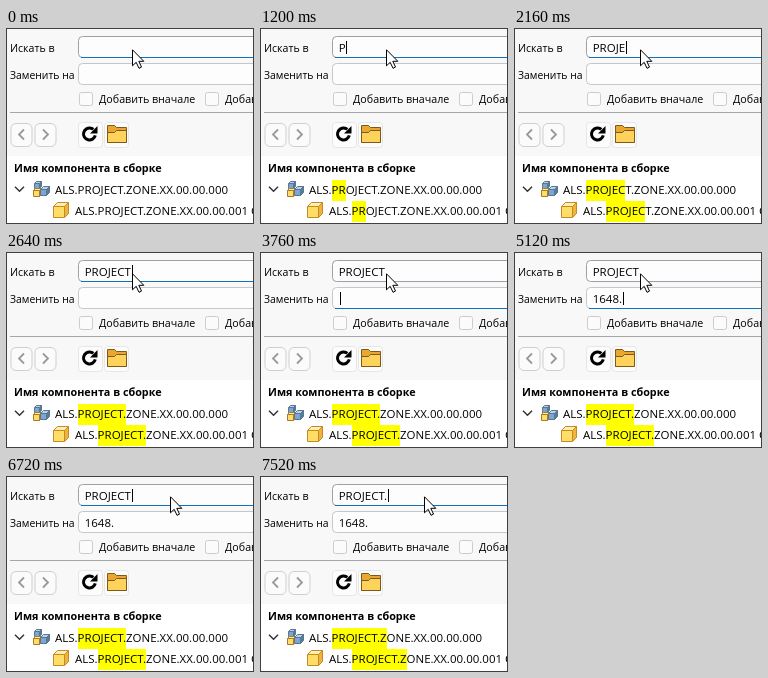
An HTML page with a canvas for the animation above (8000 ms loop, 248 by 196 pixels).

```html
<!DOCTYPE html>
<html lang="ru">
<head>
<meta charset="utf-8">
<title>Поиск и замена</title>
<style>
  html, body { margin: 0; width: 100%; height: 100%; overflow: hidden; background: #fff; }
  canvas { display: block; width: 248px; height: 196px; }
</style>
</head>
<body>
<canvas id="stage" width="248" height="196"></canvas>
<script>
const ctx = document.getElementById('stage').getContext('2d');
const LOOP = 8000;
const KEY_GAP = 240;
const FONT = '"Open Sans", "Noto Sans", sans-serif';
const TEXT_SIZE = 11.5;
const PREFIX = 'ALS.';
const NAME = PREFIX + 'PROJECT.ZONE.XX.00.00.00';
const GOLD = ['#ffdd66', '#fff0b0', '#f0b43c'];
const BLUE = ['#7ea6cc', '#b9d2ea', '#4f7da8'];

const clamp = (v, low, high) => Math.min(high, Math.max(low, v));
const keysTyped = (t, start, count) => clamp(Math.floor((t - start) / KEY_GAP) + 1, 0, count);

function setFont(size = TEXT_SIZE, weight = 400) {
  ctx.font = `${weight} ${size}px ${FONT}`;
}

function widthOf(str) {
  setFont();
  return ctx.measureText(str).width;
}

function text(str, x, y, size, weight) {
  setFont(size, weight);
  ctx.fillStyle = '#000';
  ctx.fillText(str, x, y);
}

function rect(x, y, w, h, color) {
  ctx.fillStyle = color;
  ctx.fillRect(x, y, w, h);
}

function paint(fill, stroke, width = 1) {
  if (fill) { ctx.fillStyle = fill; ctx.fill(); }
  if (stroke) { ctx.strokeStyle = stroke; ctx.lineWidth = width; ctx.stroke(); }
}

function shape(points, fill, stroke) {
  ctx.beginPath();
  points.forEach(([x, y]) => ctx.lineTo(x, y));
  ctx.closePath();
  paint(fill, stroke);
}

function box(x, y, w, h, r, fill, stroke) {
  ctx.beginPath();
  ctx.roundRect(x + 0.5, y + 0.5, w, h, r);
  paint(fill, stroke);
}

function chevron(x, y, size, angle, color, width) {
  ctx.save();
  ctx.translate(x, y);
  ctx.rotate(angle);
  ctx.beginPath();
  ctx.moveTo(-size / 2, -size);
  ctx.lineTo(size / 2, 0);
  ctx.lineTo(-size / 2, size);
  paint(null, color, width);
  ctx.restore();
}

function field(y, str, focused, caret, edge) {
  box(72, y, 190, 21, 4, '#fdfdfd', edge);
  if (focused) rect(75, y + 21, 172, 1, '#0f72bd');
  text(str, 78.7, y + 16);
  if (focused && caret) rect(Math.round(79.5 + widthOf(str)), y + 5, 1, 13, '#000');
}

function checkbox(x, label) {
  box(x, 64, 13, 13, 2, '#fbfbfb', '#cccccc');
  text(label, x + 20, 75, 10.7);
}

function navButton(x, angle) {
  box(x - 11, 95, 21, 23, 5, '#fbfbfb', '#cfcfcf');
  chevron(x, 106.5, 5, angle, '#999', 1.8);
}

function refreshIcon(x, y) {
  ctx.beginPath();
  ctx.arc(x, y, 6, 0.25, Math.PI * 1.72);
  paint(null, '#000', 3);
  shape([[x + 8, y - 8], [x + 8, y - 0.5], [x + 0.5, y - 0.5]], '#000');
}

function folderIcon(x, y) {
  shape([[x, y], [x + 7, y], [x + 9, y + 2], [x + 19, y + 2], [x + 19, y + 17], [x, y + 17]], '#e8a730', '#7d5a1c');
  shape([[x, y + 7], [x + 7, y + 7], [x + 9, y + 5], [x + 19, y + 5], [x + 19, y + 17], [x, y + 17]], '#ffd25c', '#7d5a1c');
}

function cube(x, y, s, d, [front, top, side], line) {
  shape([[x, y + d], [x + s, y + d], [x + s, y + d + s], [x, y + d + s]], front, line);
  shape([[x, y + d], [x + d, y], [x + s + d, y], [x + s, y + d]], top, line);
  shape([[x + s, y + d], [x + s + d, y], [x + s + d, y + s], [x + s, y + d + s]], side, line);
}

// The highlight runs one letter ahead of the typed text.
function treeRow(x, baseline, suffix, typed) {
  if (typed) {
    const start = Math.round(x + widthOf(PREFIX));
    const end = Math.round(x + widthOf(NAME.slice(0, PREFIX.length + typed + 1)));
    rect(start, baseline - 14, end - start, 21, '#ffff00');
  }
  text(NAME + suffix, x, baseline);
}

function tree(typed) {
  text('Имя компонента в сборке', 8, 144, 10.8, 700);
  chevron(13.5, 161, 4.5, Math.PI / 2, '#333', 1.5);
  cube(28.5, 153.5, 5, 2, BLUE, '#5b7690');
  cube(27.5, 160.5, 6, 2, GOLD, '#a87a2a');
  cube(34.5, 158.5, 6, 3, BLUE, '#5b7690');
  cube(47.5, 174.5, 11, 4, GOLD, '#c48a25');
  treeRow(49, 166, '0', typed);
  treeRow(69, 187, '1 C', typed);
}

// The pointer accelerates to the right in 80 ms steps.
function pointer(t) {
  const p = clamp(Math.floor((t - 6400) / 80) / 4, 0, 1) ** 3;
  const x = Math.round(126 + 38 * p) + 0.5;
  const y = Math.round(21 - p) + 0.8;
  const outline = [[0, 0], [0, 16], [3.7, 12.5], [6.5, 18.5], [9, 17.3], [6.3, 11.5], [11.3, 11.5]];
  shape(outline.map(([dx, dy]) => [x + dx, y + dy]), '#fff', '#000');
}

function draw(t) {
  const searchFocused = t < 3280 || t >= 6560;
  const replaceFocused = t >= 3760 && t < 6560;
  const caret = t >= 720 && !(t >= 5920 && t < 6560);
  const searchKeys = keysTyped(t, 1200, 7) + keysTyped(t, 7440, 1);
  const replaceKeys = keysTyped(t, 4160, 5);

  rect(0, 0, 248, 196, '#f8f8f8');
  rect(0, 128, 248, 68, '#fff');
  rect(4, 84, 244, 1, '#a6a6a6');

  text('Искать в', 4, 24, 10.6);
  text('Заменить на', 4, 51, 10.4);
  field(8, 'PROJECT.'.slice(0, searchKeys), searchFocused, caret, '#9da1a6');
  field(35, '1648.'.slice(0, replaceKeys), replaceFocused, caret, '#c2c8ce');

  checkbox(73, 'Добавить вначале');
  checkbox(199, 'Добавить');

  navButton(15.5, Math.PI);
  navButton(39.5, 0);
  box(72, 94, 24, 25, 3, '#fcfcfc', '#e6e6e6');
  box(98, 94, 24, 25, 3, '#fcfcfc', '#e6e6e6');
  refreshIcon(83.5, 106);
  folderIcon(101.5, 97.5);

  tree(searchKeys);
  pointer(t);

  ctx.strokeStyle = '#404040';
  ctx.lineWidth = 1;
  ctx.strokeRect(0.5, 0.5, 247, 195);
}

function tick() {
  draw(performance.now() % LOOP);
  requestAnimationFrame(tick);
}
tick();
</script>
</body>
</html>
```
